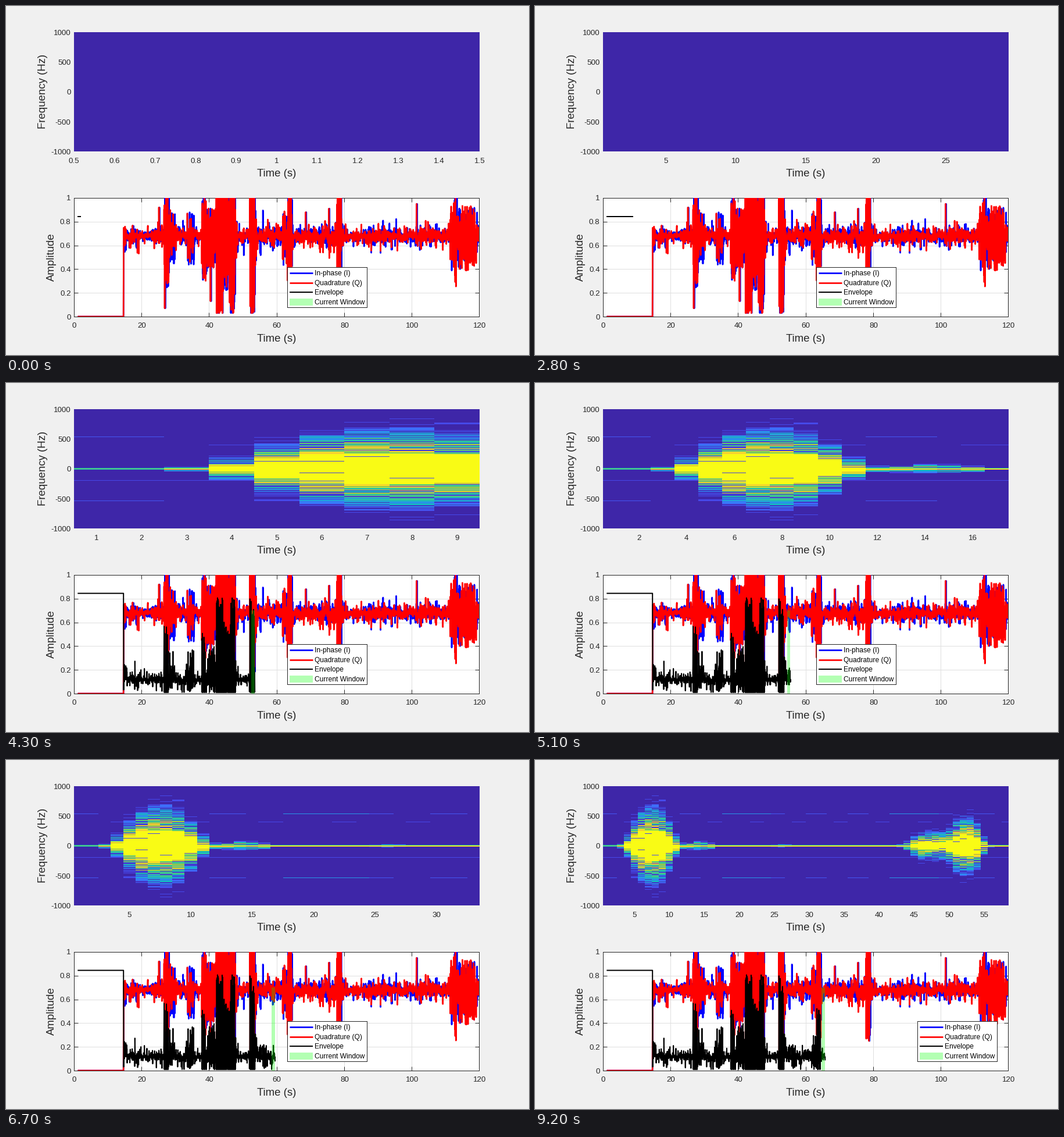
A matplotlib script that plays this animation: 900x600 px, repeating every 9300 ms.

```python
import math

import numpy as np
import matplotlib.pyplot as plt
from matplotlib.animation import FuncAnimation
from matplotlib.colors import LinearSegmentedColormap
from matplotlib.patches import Rectangle

W, H = 900, 600
FRAMES, INTERVAL = 93, 100
RESTART = 35          # the spectrogram starts over here
LEGEND_MOVE = 81      # the legend makes room for the envelope
COLS, ROWS = 58, 205
INK = "#262626"
PX = 0.72             # points per pixel at 100 dpi

plt.rcParams["font.family"] = "Liberation Sans"
fig = plt.figure(figsize=(9, 6), dpi=100, facecolor="#f0f0f0")


def pixel_axes(x, y, w, h, **kw):
    return fig.add_axes([x / W, 1 - (y + h) / H, w / W, h / H], **kw)


def label(x, y, s, size=13.33, ha="center", va="baseline", **kw):
    return fig.text(x / W, 1 - y / H, s, fontsize=size * PX, color=INK,
                    ha=ha, va=va, **kw)


def axis_names(x, y, y_name, base):
    label(466, base, "Time (s)", 18.67)
    label(x, y, y_name, 18.67, ha="right", va="center", rotation=90)


def frame_lines(ax):
    for side in ax.spines.values():
        side.set(linewidth=PX, color=INK)


# ---- spectrogram -------------------------------------------------------
parula = LinearSegmentedColormap.from_list("parula", [
    "#3e26a8", "#4746e8", "#4367fd", "#2d8cf3", "#12beb9",
    "#37c897", "#abc739", "#fec338", "#f9fb15"])

# wide-band events: (centre column, width, height in rows)
HUMPS = [(7.5, 3.2, 72), (14.5, 2, 8), (26, 1.5, 3), (47.3, 3.2, 26),
         (52.5, 2.4, 52)]


def column(c, rng):
    """Levels of one time slice: bright core, streaky flanks, centre line."""
    mid = ROWS // 2
    d = np.abs(np.arange(ROWS) - mid)
    spread = sum(h * math.exp(-abs((c - x) / w) ** 3) for x, w, h in HUMPS)
    core = max(0, .42 * spread - 4)
    gain, gap = rng.random((2, ROWS))
    s = np.clip((d - core) / max(spread - core, 1), 0, 1)
    level = (1.08 - .8 * s ** 1.3) * (.55 + .45 * gain)
    level[gap < .08 + .38 * s] *= .15
    level[d > spread] = 0
    level[(d > spread) & (d < 1.25 * spread) & (gap < .12)] = .14
    level[(d <= core) & (gap > .1 * d / max(core, 1))] = 1
    if core < 2:
        level[mid - 1:mid + 2] = (.5, .7, .5) if c < 3 else (.55, 1, .85)
    return level


rng = np.random.default_rng(8)
cols = np.arange(1, COLS + 1)
power = np.array([column(c, rng) for c in cols]).T

# faint steady tones that swell every 24 columns
swell = np.cos(2 * np.pi * (cols - 21) / 24)
tone = np.where(swell > .7, .4, np.where(cols % 6 < 3, .19, 0))
for row, levels in [(47, tone), (157, tone), (122, .13),
                    (61, .13 * (cols % 6 > 3))]:
    power[row] = np.maximum(power[row], levels)

top = pixel_axes(117, 45, 698, 205, facecolor=parula(0.0))
top.set_xticks([])
top.set_yticks([])
for side in top.spines.values():
    side.set_visible(False)
image = top.imshow(power, cmap=parula, vmin=0, vmax=1, aspect="auto",
                   interpolation="nearest",
                   extent=(.5, COLS + .5, -1000, 1000))

for f in range(-1000, 1001, 500):
    label(111.5, 152.5 - f * .1025, str(f), ha="right")
axis_names(72, 147, "Frequency (Hz)", 293)
tick_texts = [label(0, 269.5, "") for _ in range(12)]


def nice_ticks(n):
    for step in (.1, .2, .5, 1, 2, 5, 10):
        first = math.ceil(.5 / step - 1e-9)
        last = math.floor((n + .5) / step + 1e-9)
        if last - first < 12:
            return [i * step for i in range(first, last + 1)]


# ---- signals, laid out in stage pixels ---------------------------------
START, MID, REST = 202.5, .68, .12

# (start, width, gain); each burst fades out after its end
BURSTS = [(203, 5, .35), (272, 8, 1), (280, 10, .55), (312, 11, .55),
          (337, 8, .85), (345, 17, .6), (362, 11, 1.5), (373, 12, 1.05),
          (385, 9, 1.5), (420, 8, 1.5), (476, 9, .55), (485, 7, .95),
          (570, 7, .95), (765, 46, .65), (771, 5, .95)]
SPIKES = [(263, .24), (273, -.61), (352, -.55), (488, -.59), (516, .2),
          (556, .23), (575, -.43), (707, .27)]

xs = np.arange(123.3, 815, 1 / 3)
ts = (xs - 117) / 698 * 120
sign = np.where(np.arange(len(xs)) % 2, 1, -1)


def burst_gain(shift):
    gain = np.zeros(len(xs))
    for start, width, g in BURSTS:
        past = np.maximum(xs - shift - start - width, 0)
        fade = np.where(past > 0, .5 * np.exp(-past / 5), 1)
        gain = np.maximum(gain, np.where(xs >= start + shift, g * fade, 0))
    return gain


def trace(seed, rest, up, down, noise, limits, before, shift=0):
    """Noise around a rest level that swings up and down within bursts."""
    rng = np.random.default_rng(seed)
    dev = rng.laplace(0, noise, len(xs)) * (1 + .25 * np.sin(xs / 14))
    gain = burst_gain(shift)
    swing = gain * np.where(sign > 0, up, -down)
    swing *= rng.random(len(xs)) ** (.5 / np.maximum(gain, .4) ** 2)
    y = rest + np.where(gain > .2, swing, dev)
    return np.where(xs < START, before, np.clip(y, *limits))


def quadrature(seed, noise, shift):
    y = trace(seed, MID, .4, .45, noise, (.03, 1), 0, shift)
    for x, dev in SPIKES:
        y[np.searchsorted(xs, x + shift)] = MID + dev
    return y


low = pixel_axes(117, 330, 697, 204, facecolor="white")
low.set(xlim=(0, 120), ylim=(0, 1), axisbelow=True)
low.set_xticks(range(0, 121, 20))
low.set_yticks(np.arange(0, 1.01, .2))
low.grid(color="#dfdfdf", lw=PX)
low.tick_params(direction="in", length=7 * PX, width=PX, color=INK, top=True,
                right=True, labelbottom=False, labelleft=False)
frame_lines(low)

style = dict(solid_joinstyle="round", solid_capstyle="butt")
low.plot(ts, quadrature(21, .026, 1), color="blue", lw=2.67 * PX, zorder=3,
         **style)
low.plot(ts, quadrature(34, .027, 0), color="red", lw=2.67 * PX, zorder=4,
         **style)
env = trace(5, REST, .46, .2, .024, (.01, .81), .845)
env_line, = low.plot([], [], color="black", lw=2 * PX, zorder=5, **style)
window = low.add_patch(Rectangle((0, 0), 1, .7, fc=(0, 1, 0, .3), lw=0,
                                 zorder=6))

for v in range(0, 121, 20):
    label(117 + v * 698 / 120, 553, str(v))
for k in range(6):
    label(111.5, 539.2 - 41 * k, f"{k / 5:g}", ha="right")
axis_names(87, 431.5, "Amplitude", 577)

# ---- legend ------------------------------------------------------------
legend = pixel_axes(484, 449, 137, 69, facecolor="white", zorder=5)
legend.set(xlim=(0, 137), ylim=(69, 0), xticks=[], yticks=[])
frame_lines(legend)
ENTRIES = [("In-phase (I)", "blue", 2.67), ("Quadrature (Q)", "red", 2.67),
           ("Envelope", "black", 2), ("Current Window", "#b3ffb3", 12)]
for k, (name, color, width) in enumerate(ENTRIES):
    y = 10 + 16.5 * k
    legend.plot([4, 44], [y, y], color=color, lw=width * PX,
                solid_capstyle="butt")
    legend.text(47, y + 4.2, name, fontsize=12 * PX, va="baseline")
HOME = legend.get_position().bounds


def update(n):
    second = n >= RESTART
    count = n - RESTART + 1 if second else n + 1
    image.set_visible(second)
    top.set_xlim(.5, count + .5)

    ticks = nice_ticks(count)
    for text in tick_texts:
        text.set_text("")
    for text, tick in zip(tick_texts, ticks):
        text.set_text(f"{tick:g}")
        text.set_x((117 + (tick - .5) / count * 698) / W)

    end = (42.85 if second else 2.03) + .25 * n
    k = np.searchsorted(ts, end)
    env_line.set_data(ts[:k], env[:k])
    window.set_x(end - 1.1)
    window.set_visible(second)

    x, y, w, h = HOME
    legend.set_position([x + (174 / W if n >= LEGEND_MOVE else 0), y, w, h])
    return []


anim = FuncAnimation(fig, update, frames=FRAMES, interval=INTERVAL,
                     init_func=lambda: update(0), repeat=True)
plt.show()
```
